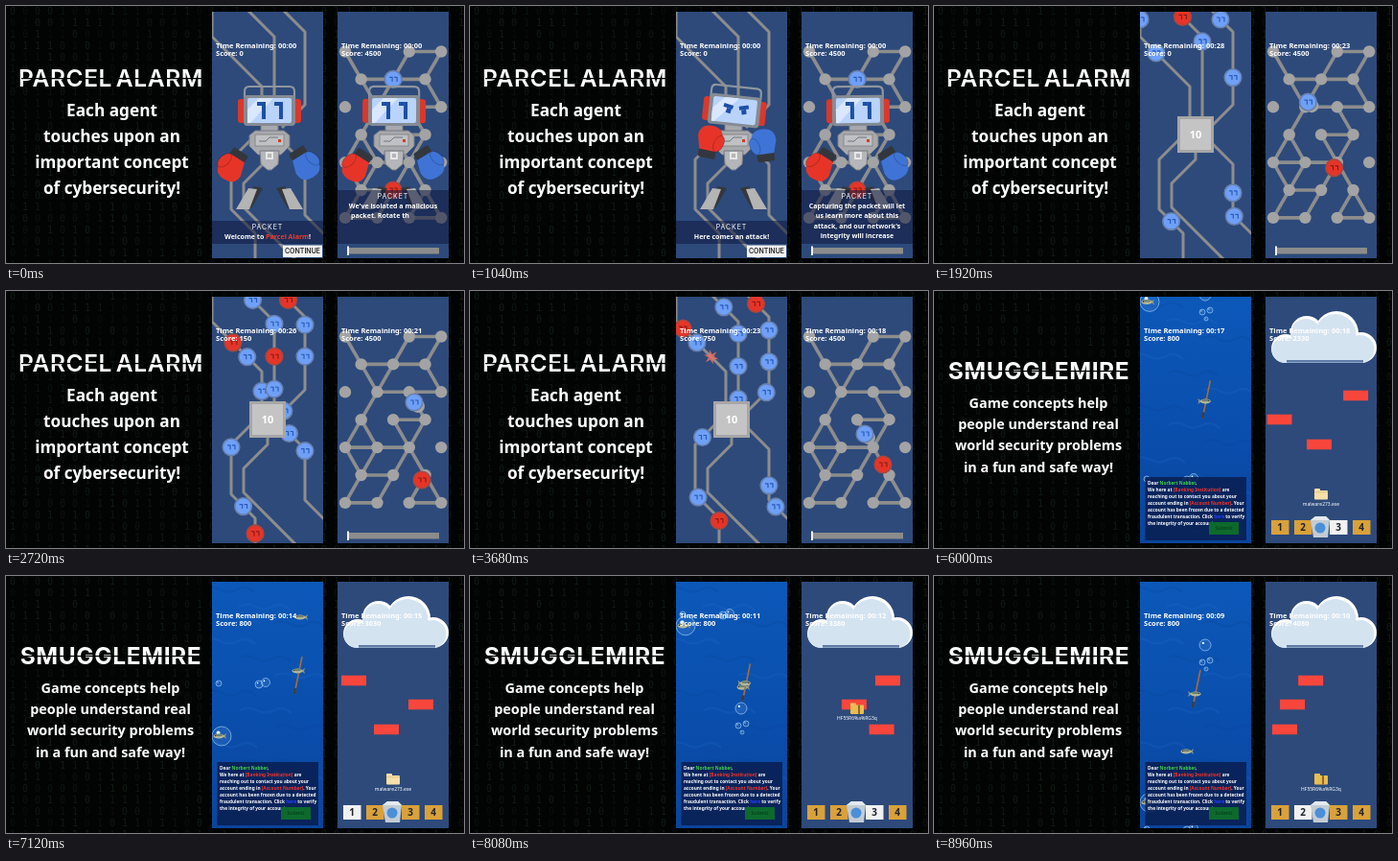
Recreate the animation shown at these times as an HTML page. Size 478x268 px, loop 9040 ms.

```html
<!DOCTYPE html>
<html lang="en">
<head>
<meta charset="utf-8">
<title>Game showcase</title>
<style>
  html, body { margin: 0; width: 100%; height: 100%; overflow: hidden; background: #020403; }
  svg { display: block; width: 100vw; height: 100vh; }
  text { font-family: "Noto Sans", "Open Sans", sans-serif; font-weight: 700; white-space: pre; }
  .tech { font-family: Inter, Roboto, sans-serif; }
  .code { font-family: "DejaVu Sans Mono", monospace; font-weight: 400; }
</style>
</head>
<body>
<svg viewBox="0 0 478 268" xmlns="http://www.w3.org/2000/svg">
  <defs>
    <clipPath id="clipL"><rect x="215" y="6" width="116" height="257"/></clipPath>
    <clipPath id="clipR"><rect x="346" y="6" width="116" height="257"/></clipPath>
    <linearGradient id="sea" x1="0" y1="0" x2="0" y2="1">
      <stop offset="0" stop-color="#0c58b8"/>
      <stop offset=".5" stop-color="#0a4fae"/>
      <stop offset="1" stop-color="#0a459c"/>
    </linearGradient>
  </defs>
  <g id="digits"></g>
  <g id="copy"></g>
  <g id="left" clip-path="url(#clipL)"></g>
  <g id="right" clip-path="url(#clipR)"></g>
</svg>
<script>
const LOOP = 9040, STEP = 80, PLAY = 1.46, CUT = 5.44;
const NAVY = '#2d4a7b', GREY = '#8d8d8d', BLUE = '#6fa0f8', RED = '#e63528';
const $ = id => document.getElementById(id);
const clamp = (v, a = 0, b = 1) => Math.min(b, Math.max(a, v));
const mix = (a, b, k) => a + (b - a) * k;
const mod = (a, n) => ((a % n) + n) % n;
const range = n => [...Array(n).keys()];

// ---------- drawing helpers ----------
const rect = (x, y, w, h, fill, extra = '') =>
  `<rect x="${x}" y="${y}" width="${w}" height="${h}" fill="${fill}" ${extra}/>`;
const circle = (x, y, r, fill, extra = '') =>
  `<circle cx="${x}" cy="${y}" r="${r}" fill="${fill}" ${extra}/>`;
const poly = (points, fill, extra = '') => `<polygon points="${points}" fill="${fill}" ${extra}/>`;
const line = (points, color, w) =>
  `<polyline points="${points}" fill="none" stroke="${color}" stroke-width="${w}" stroke-linejoin="round"/>`;
const text = (x, y, size, str, extra = '') =>
  `<text x="${x}" y="${y}" font-size="${size}" fill="#fff" ${extra}>${str}</text>`;
const mid = (x, y, size, str, extra = '') => text(x, y, size, str, 'text-anchor="middle" ' + extra);
const place = (x, y, rot, body) => `<g transform="translate(${x} ${y}) rotate(${rot})">${body}</g>`;
const tint = (color, str) => `<tspan fill="${color}">${str}</tspan>`;

const clock = s => '00:' + String(Math.max(0, Math.floor(s))).padStart(2, '0');
const hud = (x, secs, score) =>
  text(x, 43.5, 7.5, 'Time Remaining: ' + clock(secs)) + text(x, 51.5, 7.5, 'Score: ' + score);

// ---------- backdrop and copy ----------
function digits() {
  let seed = 7, out = '';
  const rnd = () => (seed = seed * 16807 % 2147483647) / 2147483647;
  for (let x = 4; x < 478; x += 13)
    for (let y = 9; y < 276; y += 12)
      out += text(x, y, 10, rnd() < .5 ? 0 : 1, `class="code" style="fill:#14221a" opacity="${.25 + .6 * rnd()}"`);
  return out;
}

function copy(title, base, size, weight, rows, cx, y, lead, rowSize) {
  return mid(109.5, base, size, title, `class="tech" style="font-weight:${weight};word-spacing:-3px;letter-spacing:.6px"`) +
    rect(16, base - size * .37, 188, 1.3, '#020403') +
    rows.map((r, i) => mid(cx, y + i * lead, rowSize, r)).join('');
}
const copyA = copy('PARCEL ALARM', 84, 24.5, 600,
  ['Each agent', 'touches upon an', 'important concept', 'of cybersecurity!'], 110.5, 115, 27, 17.2);
const copyB = copy('SMUGGLEMIRE', 92, 24.5, 700,
  ['Game concepts help', 'people understand real', 'world security problems', 'in a fun and safe way!'], 109, 122, 22.2, 14.4);

// ---------- robot ----------
const eyes = angry => angry
  ? place(-7, 107, 12, rect(-5, -4, 10, 4, '#1d4fa8') + rect(-1, 0, 5, 5, '#1d4fa8')) +
    place(10, 107, -12, rect(-5, -4, 10, 4, '#1d4fa8') + rect(-3, 0, 5, 5, '#1d4fa8'))
  : [-8, 10].map(x => rect(x - 5, 100, 5, 4, '#1d4fa8') + rect(x, 100, 4, 18, '#1d4fa8')).join('');

const glove = (x, y, rot, color, side) => place(x, y, rot,
  rect(-9, 8, 18, 10, '#33373d', 'rx="2"') +
  `<path d="M-9 10L-13 -4Q-13 -16 0 -16Q13 -16 13 -3L9 10Z" fill="${color}"/>` +
  `<ellipse cx="${side * 10}" cy="1" rx="5" ry="9" fill="${color}" stroke="#0003" transform="rotate(${side * 15} ${side * 10} 1)"/>`);

function robot(cx, t, up, angry) {
  const bob = Math.sin(t * 7) * .8;
  const rx = mix(-39, -25, up), ry = mix(167, 140, up) + bob;
  const bx = mix(37, 32, up), by = mix(165, 145, up) - bob;
  const leg = s => `<g transform="scale(${s} 1)">` +
    poly('7,190 16,188 31,208 19,211', '#34373c') + poly('13,191 22,190 35,212 21,212', '#b4b4b4') + '</g>';
  const head =
    '<path d="M-26 98V89Q-26 84 -21 84H21Q26 84 26 89V98" fill="none" stroke="#8f959d" stroke-width="2.2"/>' +
    rect(-33, 97, 10, 25, '#d9382d', 'rx="3"') + rect(23, 97, 10, 25, '#d9382d', 'rx="3"') +
    rect(-27, 93, 54, 32, '#858b94', 'rx="4"') +
    rect(-23, 96, 46, 26, '#b9d3fb', 'rx="2"') + poly('-23,122 -23,108 -11,96 4,96 -20,122', '#d9e7ff') + eyes(angry);
  return place(cx, 0, 0,
    leg(-1) + leg(1) +
    rect(-9, 123, 18, 9, '#a7a9ad', 'stroke="#777b82"') +
    poly('-21,135 -15,130 15,130 21,135 21,146 12,155 -12,155 -21,146', '#a7a9ad', 'stroke="#777b82"') +
    poly('-10,151 10,151 9,165 2,171 -2,171 -9,165', '#b5b6b9', 'stroke="#777b82"') +
    rect(-15, 134, 30, 12, '#bfc1c4', 'stroke="#888"') + line('-11,141 -4,141 0,137 9,137', '#70757d', 1) +
    rect(9, 139, 3, 3, '#d9382d') + rect(-4, 152, 8, 8, '#e6e6e6') + rect(-2, 154, 4, 4, '#b5b5b5') +
    `<g transform="rotate(${angry ? 6 * up : bob} 0 118)">${head}</g>` +
    glove(rx, ry, mix(212, 372, up), RED, 1) + glove(bx, by, mix(148, -8, up), '#3f74d6', -1));
}

// Unseen letters still take space, so the lines do not shift while typing.
function typed(cx, y, lead, rows, n) {
  return rows.map((r, i) => {
    const k = clamp(Math.floor(n), 0, r.length);
    n -= r.length;
    return mid(cx, y + i * lead, 7.05, r.slice(0, k) + `<tspan fill="none">${r.slice(k)}</tspan>`);
  }).join('');
}
const speaker = (cx, y) => mid(cx, y, 7, 'PACKET', 'class="tech" style="font-weight:400;letter-spacing:.9px"');
const dialog = (x, y, h) => rect(x, y, 116, h, '#10193f', 'opacity=".55"');

// ---------- node lines with balls ----------
const ball = (x, y, red) =>
  circle(x, y, 8.8, red ? RED : BLUE, `stroke="${red ? '#a8473f' : '#6880ac'}" stroke-width="1.6"`) +
  [-4, 1].map(d => line(`${x + d},${y - 2} ${x + d + 3},${y - 2} ${x + d + 3},${y + 2.5}`, red ? '#8c1d17' : '#2a5cb8', 1.2)).join('');

const burst = (x, y, k) => place(x, y, k * 60,
  poly(range(12).map(i => {
    const r = i % 2 ? 3 : 8, a = i * Math.PI / 6;
    return `${(r * Math.cos(a)).toFixed(1)},${(r * Math.sin(a)).toFixed(1)}`;
  }).join(' '), '#ee7060', `opacity="${1 - k * .6}"`));

function along(pts, s) {
  if (s < 0) return null;
  for (let i = 1; i < pts.length; i++) {
    const [x, y] = pts[i - 1], [u, v] = pts[i], d = Math.hypot(u - x, v - y);
    if (s <= d) return [mix(x, u, s / d), mix(y, v, s / d)];
    s -= d;
  }
  return null;
}

// b blue, r red that is cleaned at `clean`, x red that is removed there
const lanes = [
  { pts: [[215, 0], [215, 32], [267, 84], [267, 118]], ref: 63, gap: 21, rate: 4.17, u: 4, first: -3, clean: .9, row: 'b.br..cbr...br.r.b'.replace('c', 'r') },
  { pts: [[230, -18], [280, 32], [280, 118]], ref: 70.7, gap: 34, rate: 2.4, u: 2.37, first: -2, clean: 1.3, row: 'brbbbbbrbbb' },
  { pts: [[262, -23], [312, 27], [312, 103], [288, 127]], ref: 70.7, gap: 33, rate: 2.26, u: 2.42, first: -3, clean: .3, row: 'b.bbrbr..rb' },
  { pts: [[260, 283], [260, 237], [235, 212], [235, 160], [258, 137]], ref: 20, gap: 33.5, rate: 2.5, u: 2.7, first: -3, clean: 1.6, row: 'b.bxbrbbrbb' },
  { pts: [[351, 257], [312, 218], [312, 165], [288, 141]], ref: 28.3, gap: 25, rate: 2.66, u: 2.68, first: -4, clean: 1.7, row: 'bb...bb.brbb' }
];
const wires = [...lanes.map(l => l.pts), [[273, 150], [273, 160], [248, 185], [248, 210], [306, 268]]]
  .map(p => line(p.join(' '), GREY, 3)).join('');

function laneBalls(l, t) {
  const u = l.u + l.rate * (t - 3.68);
  return [...l.row].map((kind, i) => {
    const p = u - l.first - i, at = along(l.pts, l.ref + p * l.gap);
    if (kind === '.' || !at) return '';
    if (kind === 'b') return ball(...at);
    const past = p - l.clean;
    if (past < 0) return ball(...at, true);
    if (past < .35) return burst(...at, past / .35);
    return kind === 'x' ? '' : ball(...at);
  }).join('');
}

function leftGame(t) {
  const intro = t < PLAY;
  let out = rect(215, 6, 116, 257, NAVY) + wires;
  if (intro) {
    const next = t >= .56;
    out += hud(219, 0, 0) + robot(275, t, clamp((t - .56) / .24), next) +
      dialog(215, 224, 24) + speaker(273, 233);
    out += next ? typed(273, 243, 10, ['Here comes an attack!'], (t - .56) * 190)
      : mid(273, 243, 7.05, 'Welcome to ' + tint('#f0392d', 'Parcel Alarm') + '!');
    return out + rect(289, 249.5, 41, 12.5, '#f4f4f4') +
      mid(309.5, 258.4, 7, 'CONTINUE', 'class="tech" style="fill:#222;font-weight:600"');
  }
  out += lanes.map(l => laneBalls(l, t)).join('') +
    rect(255.5, 116.5, 35, 35, '#c4c4c4', 'stroke="#a6a6a6" stroke-width="3"') + mid(273, 138, 11, '10');
  return out + hud(219, Math.min(30, 26.5 - 2.78 * (t - 2.72)), 50 * Math.max(0, Math.floor(3.6 + 12 * (t - 2.72))));
}

// ---------- lattice ----------
// Nodes are named row + column; odd rows have three nodes, shifted half a cell.
const node = id => [(id[0] % 2 ? 370.7 : 354) + id[1] * 33.4, 47.5 + id[0] * 28.9];
const edges = ('00-10 02-03 02-11 03-12 10-11 11-12 10-21 11-21 12-23 21-22 22-23 22-32 21-30 ' +
  '30-40 30-41 31-32 31-42 40-41 41-42 32-42 40-50 41-50 50-60 50-51 60-61 51-61 42-51 42-52 52-62 52-63 62-63').split(' ');
const lattice = edges.map(e => line(e.split('-').map(node).join(' '), GREY, 3.6)).join('') +
  range(7).map(r => range(r % 2 ? 3 : 4).map(c => {
    const id = '' + r + c;
    return id === '01' ? '' : circle(...node(id), 6.2, '#a3a3a3');
  }).join('')).join('');

// keys: [time, node or point]
const blueWay = [[PLAY, '11'], [2.02, '21'], [2.55, '22'], [2.72, [426, 116]], [3.01, '32'], [3.45, '31'], [3.68, [412, 149]],
  [3.9, '42'], [4.31, '32'], [4.74, '42'], [5.12, [391, 163]], [5.18, '41'], [5.6, '50']];
const redWay = [[PLAY, '51'], [2.03, '42'], [2.61, '52'], [2.72, [434, 197]], [3.07, '62'], [3.51, '52'], [3.68, [431, 181]],
  [3.98, '42'], [4.46, '41'], [4.93, '40'], [5.12, [360, 174]], [5.4, '50'], [5.8, '60']];
const spot = p => typeof p === 'string' ? node(p) : p;
function walk(way, t) {
  let i = 1;
  while (i < way.length - 1 && way[i][0] < t) i++;
  const [t0, a] = way[i - 1], [t1, b] = way[i], k = clamp((t - t0) / (t1 - t0));
  const [x, y] = spot(a), [u, v] = spot(b);
  return [mix(x, u, k), mix(y, v, k)];
}

const brief = ["We've isolated a malicious", 'packet. Rotate the nodes', 'to capture it!'];
const reason = ['Capturing the packet will let', 'us learn more about this', "attack, and our network's", 'integrity will increase'];

function rightGame(t) {
  const [bx, by] = walk(blueWay, t), [rx, ry] = walk(redWay, t);
  let out = rect(346, 6, 116, 257, NAVY) + lattice +
    (t < PLAY ? '' : circle(bx + 4, by + 4, 7, '#a3a3a3')) + ball(bx, by) + ball(rx, ry, true) +
    rect(357, 252, 95, 6.5, '#8c8c8c') + rect(356, 250.5, 2, 9.5, '#f2f2f2');
  if (t < PLAY) {
    out += robot(405, t + .4, 0, false) + dialog(346, 192, 56) + speaker(404, 200.5);
    out += t < .4 ? typed(404, 210.5, 10.6, brief, 43 + t * 190) : typed(404, 210.5, 10.6, reason, (t - .4) * 190);
    return out + hud(350, 0, 4500);
  }
  return out + hud(350, Math.min(25, 21.5 - 2.78 * (t - 2.72)), 4500);
}

// ---------- sea ----------
const waves = range(14).map(i => {
  const x = 205 + i * 37 % 110, y = 14 + i * 18;
  return `<path d="M${x} ${y}q9 -5 18 0t18 0t18 3" fill="none" stroke="${i % 2 ? '#2a78d0' : '#083f88'}" stroke-width="2.5" opacity=".16"/>`;
}).join('');
const fish = (x, y, flip = 1) => `<g transform="translate(${x} ${y}) scale(${flip} 1)">` +
  poly('4,0 8,-3 7,0 8,3', '#8d9a80') + '<ellipse rx="5.5" ry="2.6" fill="#b3b89a"/><ellipse cy="-1" rx="4" ry="1.2" fill="#71806f"/>' +
  circle(-3.6, -.4, .7, '#222') + '</g>';
const bubble = (x, y, r) => circle(x, y, r, '#8cc4ff22', 'stroke="#a9d2f8" stroke-width=".8" stroke-opacity=".8"') +
  circle(x - r * .35, y - r * .35, r * .2, '#e4f3ff');
const rise = (y, t, v = 75) => mod(y - v * (t - 7.12) + 20, 290) - 20;

const mail = [
  'Dear ' + tint('#3fd04a', 'Norbert Nabber') + ',',
  'We here at ' + tint('#f0342c', '[Banking Institution]') + ' are',
  'reaching out to contact you about your',
  'account ending in ' + tint('#f0342c', '[Account Number]') + '. Your',
  'account has been frozen due to a detected',
  'fraudulent transaction. Click ' + tint('#2440ff', 'here') + ' to verify',
  'the integrity of your account.'
].map((r, i) => text(223, 202 + i * 7, 4.75, r)).join('');

function sea(t) {
  const k = (t - 7.12) / 1.84, c = Math.cos(Math.PI * k);
  const x = 289.5 + 15.5 * c, y = 110 - 7 * c;
  const drift = [[264, 113, 4], [271, 111, 4.5], [222, 112, 3], [283, 210, 6], [280, 228, 3], [288, 226, 3], [284, 235, 2]];
  const by = rise(167, t, 120);
  return rect(215, 6, 116, 257, 'url(#sea)') + waves +
    drift.map(([bx, y0, r]) => bubble(bx, rise(y0, t), r)).join('') +
    bubble(225, by, 10) + fish(222, by) +
    fish(mix(307, 263, k), mix(43, 183, k)) +
    line(`${x + 4},${y - 19} ${x - 4},${y + 20}`, '#a56d3a', 1.6) + line(`${x - 3},${y + 14} ${x - 4},${y + 20}`, '#4a3424', 2) +
    fish(x - 1, mix(99, 123, (1 - c) / 2), k < 0 || k > .5 ? -1 : 1) +
    hud(219, 14.5 - 2.78 * (t - 7.12), 800) +
    rect(220.5, 194, 105.5, 66, '#0a1f52', 'opacity=".88"') + mail +
    rect(287, 241, 31, 13, '#0d6a2c') + mid(302.5, 249.3, 5, 'Submit', 'style="fill:#0a4420"');
}

// ---------- cloud ----------
const pingpong = (d, n) => n - Math.abs(mod(d, 2 * n) - n);
const puffs = [[367, 60, 15], [389, 43, 17], [420, 44, 23], [446, 59, 16]];
const cloud = puffs.map(([x, y, r]) => circle(x, y, r, '#fff')).join('') +
  puffs.map(([x, y, r]) => circle(x - 1, y + 1.5, r - 1.5, '#d4e3f0')).join('') + rect(366, 50, 80, 25, '#d4e3f0') +
  rect(368, 72, 80, 2.6, '#5f7ca8');
// [y, offset, speed]
const blocks = [[104, 4, 76], [129, 74, 64.7], [155, 38, 72.3]];

function folder(x, y, zipped) {
  const color = zipped ? '#e9bd52' : '#f6dfa8';
  return rect(x - 7, y - 6, 6, 4, color, 'rx="1"') + rect(x - 7, y - 4, 14, 9.5, color, 'rx="1"') +
    (zipped ? rect(x + 1, y - 4, 2, 9.5, '#8d6a24') : rect(x - 7, y - 2.6, 14, .8, '#dcbd78'));
}

function upload(t) {
  const turn = (t - 7.12) / (1.84 / 3) + .15, n = Math.floor(turn);
  const y = 212 - 140 * clamp((turn - n - .4) / .6);
  const zipped = mod(n, 2) === 1, picked = mod(n, 3) === 0 ? (n < 3 ? 0 : 1) : mod(n, 3) + 1;
  return rect(346, 6, 116, 257, NAVY) + cloud +
    blocks.map(([by, d, v]) => rect(346 + pingpong(d + v * (t - 7.12), 89), by - .3, 26, 10.6, '#f9463d')).join('') +
    folder(404, y, zipped) +
    mid(404, y + 11.5, 5, zipped ? 'HF55R6%a%RG3q' : 'malware273.exe', 'style="font-weight:500"') +
    [352, 376, 413, 437].map((x, i) => rect(x, 239, 18.5, 15, i === picked ? '#f1f1f1' : '#d9a13a') +
      mid(x + 9.2, 250.3, 10, i + 1, 'style="fill:#20242c"')).join('') +
    poly('393,239 398,235 409,235 413,239 411,257 396,257', '#c3ccd4') + poly('393,239 398,235 409,235 413,239', '#e4e9ed') +
    circle(403, 247, 5.5, '#4b8fd8') +
    hud(350, 15.5 - 2.78 * (t - 7.12), 3030 + 350 * n);
}

// ---------- loop ----------
$('digits').innerHTML = digits();
let shown = -1;
const start = performance.now();
function draw(ms) {
  const step = Math.floor(ms % LOOP / STEP);
  if (step === shown) return;
  shown = step;
  const t = step * STEP / 1000, first = t < CUT;
  $('copy').innerHTML = first ? copyA : copyB;
  $('left').innerHTML = first ? leftGame(t) : sea(t);
  $('right').innerHTML = first ? rightGame(t) : upload(t);
}
function tick() {
  draw(performance.now() - start);
  requestAnimationFrame(tick);
}
tick();
</script>
</body>
</html>
```
